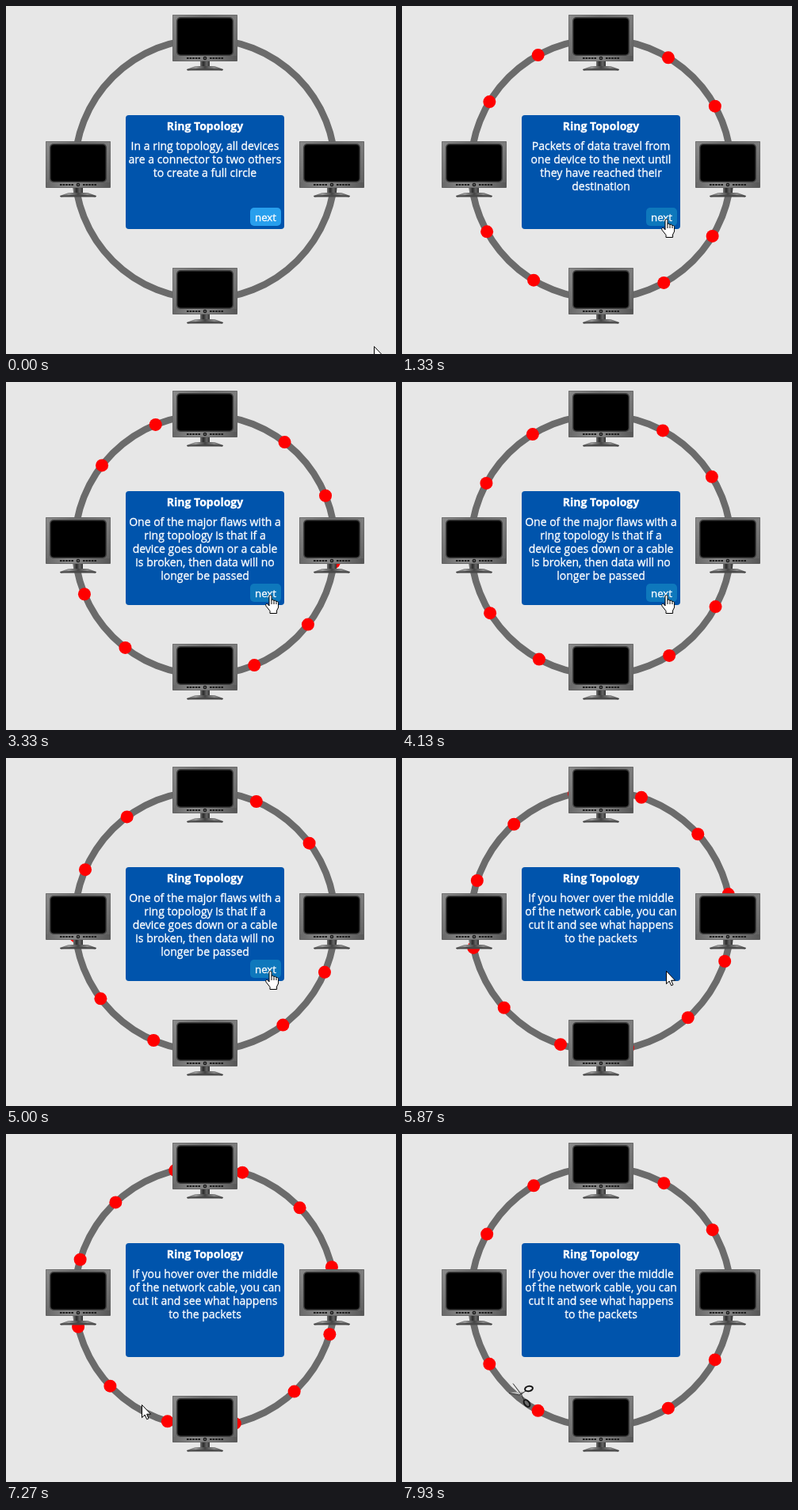
Recreate the animation shown at these times as an HTML page with a canvas. Size 492 by 440 pixels, loop 8000 ms.

```html
<!DOCTYPE html>
<html lang="en">
<head>
<meta charset="utf-8">
<title>Ring Topology</title>
<style>
  html, body { margin: 0; width: 100%; height: 100%; overflow: hidden; background: #e7e7e7; }
  canvas { display: block; }
</style>
</head>
<body>
<canvas id="stage" width="492" height="440"></canvas>
<script>
const ctx = document.getElementById('stage').getContext('2d');
const LOOP = 8000, STEP = 1000 / 15;
const CENTER = { x: 251, y: 206 }, RADIUS = 164.3;
const PACKETS_START = 1330, PACKET_SPEED = 63.3, PACKET_COUNT = 12;

const slides = [
  { from: 0, lines: ['In a ring topology, all devices', 'are a connector to two others', 'to create a full circle'] },
  { from: 1330, lines: ['Packets of data travel from', 'one device to the next until', 'they have reached their', 'destination'] },
  { from: 2870, lines: ['One of the major flaws with a', 'ring topology is that if a', 'device goes down or a cable', 'is broken, then data will no', 'longer be passed'] },
  { from: 5470, last: true, lines: ['If you hover over the middle', 'of the network cable, you can', 'cut it and see what happens', 'to the packets'] }
];

// Pointer stops: time, x, y
const pointerPath = [
  [0, 464, 430], [930, 333, 269], [6270, 333, 269], [7200, 171, 342],
  [7330, 171, 342], [7530, 162, 356], [7930, 150, 330]
];
const SCISSORS_FROM = 7660;

const arrowShape = new Path2D('M.5 .5V16.6L4.2 13.1L6.7 18.7L9 17.7L6.6 12.2H11.6Z');
const handShape = new Path2D('M5 14V2Q5 .5 6.5 .5Q8 .5 8 2V7.2Q8.3 6 9.6 6.2Q11 6.4 11 8Q11.3 6.9 12.6 7.2' +
  'Q14 7.5 14 9Q14.4 8.2 15.5 8.6Q16.6 9 16.6 10.5V16L14.6 20V23.5H6V20.5L1 14.2Q.1 12.4 1.4 11.6Q2.6 11 3.8 12.4Z');

function box(x, y, w, h, r, fill) {
  ctx.beginPath();
  ctx.roundRect(x, y, w, h, r);
  ctx.fillStyle = fill;
  ctx.fill();
}

function poly(points, fill) {
  ctx.beginPath();
  points.forEach(([x, y]) => ctx.lineTo(x, y));
  ctx.closePath();
  ctx.fillStyle = fill;
  ctx.fill();
}

function dot(x, y, r, fill) {
  ctx.beginPath();
  ctx.arc(x, y, r, 0, Math.PI * 2);
  ctx.fillStyle = fill;
  ctx.fill();
}

function gradient(x0, y0, x1, y1, ...colors) {
  const g = ctx.createLinearGradient(x0, y0, x1, y1);
  colors.forEach((c, i) => g.addColorStop(i / (colors.length - 1), c));
  return g;
}

// A hairline stroke gives the letters a slightly heavier stem.
function label(text, x, y, font) {
  ctx.font = font + ' "Open Sans", sans-serif';
  ctx.textAlign = 'center';
  ctx.fillStyle = ctx.strokeStyle = '#fff';
  ctx.lineWidth = .3;
  ctx.fillText(text, x, y);
  ctx.strokeText(text, x, y);
}

function drawMonitor(x, y) {
  ctx.save();
  ctx.translate(x, y);
  box(35, 58, 12, 8, 0, gradient(35, 0, 47, 0, '#777', '#2a2a2a', '#666', '#333'));
  poly([[29, 65], [53, 65], [64, 69], [63, 70.5], [50, 69], [32, 69], [19, 70.5], [18, 69]],
    gradient(18, 0, 64, 0, '#555', '#999', '#444', '#888', '#444'));
  poly([[18, 69], [32, 68], [50, 68], [64, 69], [63, 70.5], [19, 70.5]], '#484848');
  box(0, 0, 82, 59, 1, '#5a5a5a');
  box(.5, .5, 81, 58, 1, gradient(0, 0, 82, 59, '#8c8c8c', '#6c6c6c', '#7c7c7c', '#5c5c5c'));
  box(1, 52, 80, 6, 0, gradient(0, 0, 82, 0, '#666', '#8a8a8a', '#777', '#555'));
  box(5, 3, 72, 49, 5, '#3e3e3e');
  box(6.5, 4.5, 69, 46, 4, '#000');
  ctx.fillStyle = '#1d1d1d';
  for (let i = 0; i < 5; i++) {
    ctx.fillRect(18 + i * 3.6, 54, 2.6, 2);
    ctx.fillRect(47 + i * 3.6, 54, 2.6, 2);
  }
  dot(41, 55, 2.3, '#181818');
  dot(41, 55, .9, '#777');
  ctx.restore();
}

function drawRing() {
  ctx.beginPath();
  ctx.arc(CENTER.x, CENTER.y, RADIUS, 0, Math.PI * 2);
  ctx.lineWidth = 8.6;
  ctx.strokeStyle = '#6b6b6b';
  ctx.stroke();
}

function drawPackets(t) {
  if (t < PACKETS_START) return;
  const turn = .6 + PACKET_SPEED * (t - PACKETS_START) / 1000;
  for (let i = 0; i < PACKET_COUNT; i++) {
    const a = (turn + i * 360 / PACKET_COUNT) * Math.PI / 180;
    dot(CENTER.x + RADIUS * Math.sin(a), CENTER.y - RADIUS * Math.cos(a), 8, '#f00');
  }
}

function drawCard(slide, hovered) {
  box(151, 138, 200, 144, 4, '#0054ac');
  label('Ring Topology', 251, 157, 'bold 14px');
  slide.lines.forEach((line, i) => label(line, 251, 182 + i * 17, '14px'));
  if (slide.last) return;
  box(308, 255, 39, 23, 5, hovered ? '#0e78bc' : '#289fed');
  label('next', 327.5, 272, '13.3px');
}

function pointerAt(t) {
  const i = pointerPath.findIndex(p => p[0] > t);
  if (i < 0) return pointerPath[pointerPath.length - 1].slice(1);
  const [t0, x0, y0] = pointerPath[i - 1], [t1, x1, y1] = pointerPath[i];
  const k = (t - t0) / (t1 - t0), e = k * k * (3 - 2 * k);
  return [Math.round(x0 + (x1 - x0) * e), Math.round(y0 + (y1 - y0) * e)];
}

function drawCursor(shape, x, y) {
  ctx.save();
  ctx.translate(x, y);
  ctx.fillStyle = '#fff';
  ctx.fill(shape);
  ctx.lineWidth = 1;
  ctx.strokeStyle = '#000';
  ctx.stroke(shape);
  if (shape === handShape) {
    ctx.beginPath();
    for (const fx of [8, 11, 14]) {
      ctx.moveTo(fx, fx / 3 + 4.5);
      ctx.lineTo(fx, 12);
    }
    ctx.stroke();
  }
  ctx.restore();
}

function drawScissors(x, y) {
  ctx.save();
  ctx.translate(x - 16, y - 16);
  poly([[1, 13], [18, 11.5], [20, 14], [13, 16]], '#b9b9b9');
  poly([[6, 1], [17, 13], [18, 17], [14, 14]], '#d0d0d0');
  ctx.strokeStyle = '#333';
  ctx.lineWidth = 1;
  ctx.beginPath();
  ctx.moveTo(1, 13.5);
  ctx.lineTo(14, 16);
  ctx.lineTo(22, 11);
  ctx.moveTo(6, 1.5);
  ctx.lineTo(17, 16);
  ctx.lineTo(20, 23);
  ctx.stroke();
  ctx.strokeStyle = '#161616';
  ctx.lineWidth = 2;
  for (const [cx, cy, rx, ry, tilt] of [[26, 8, 5, 3.2, -.2], [23.5, 26.5, 5, 3, .9]]) {
    ctx.beginPath();
    ctx.ellipse(cx, cy, rx, ry, tilt, 0, Math.PI * 2);
    ctx.stroke();
  }
  dot(16.5, 14.5, 1.2, '#444');
  ctx.restore();
}

function render(now) {
  const t = Math.floor((now % LOOP + 4) / STEP) * STEP % LOOP;
  const slide = slides.filter(s => s.from <= t + 5).pop();
  const [px, py] = pointerAt(t);
  const hovered = !slide.last && px >= 308 && px < 347 && py >= 255 && py < 278;

  ctx.fillStyle = '#e7e7e7';
  ctx.fillRect(0, 0, 492, 440);
  drawRing();
  drawPackets(t + 5);
  for (const [x, y] of [[210, 11], [50, 171], [370, 171], [210, 331]]) drawMonitor(x, y);
  drawCard(slide, hovered);

  if (t >= SCISSORS_FROM) drawScissors(px, py);
  else if (hovered) drawCursor(handShape, px - 6, py);
  else drawCursor(arrowShape, px, py);
}

function loop() {
  render(performance.now());
  requestAnimationFrame(loop);
}
loop();
</script>
</body>
</html>
```
